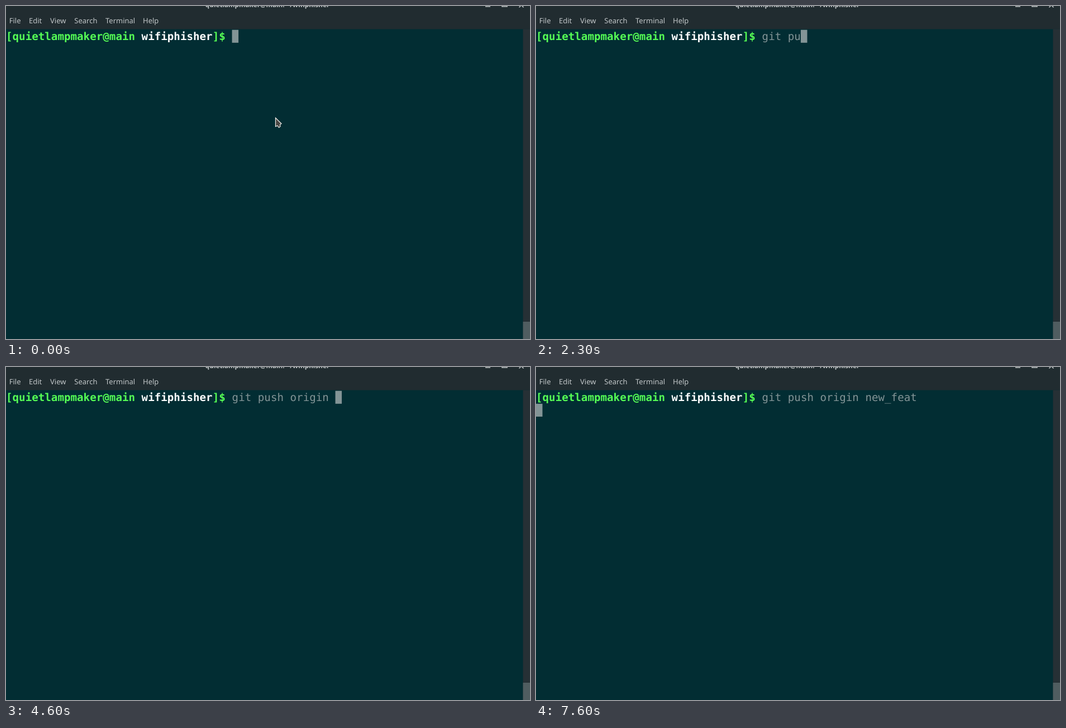
Recreate the animation shown at these times as an HTML page. Size 938 by 597 pixels, loop 8000 ms.

```html
<!DOCTYPE html>
<html lang="en">
<head>
<meta charset="utf-8">
<title>Terminal</title>
<style>
  html, body { margin: 0; width: 100%; height: 100%; overflow: hidden; background: #022d33; }
  svg { display: block; }
  text { white-space: pre; text-rendering: geometricPrecision; }
  .mono { font: 19.2px "DejaVu Sans Mono", monospace; fill: #839496; }
  .prompt { font-weight: bold; fill: #5f5; }
  .menu { font: 13px "Noto Sans", sans-serif; fill: #c1c6c8; }
  .title { font: bold 11.7px "Noto Sans", sans-serif; fill: #c1c6c8; }
</style>
</head>
<body>
<svg width="938" height="597" viewBox="0 0 938 597">
  <rect width="938" height="597" fill="#022d33"/>
  <rect width="938" height="41.500" fill="#212c30"/>
  <rect x="925.500" y="41.500" width="13" height="556" fill="#263035"/>
  <rect x="925.500" y="566" width="13" height="31" fill="#505d60"/>

  <text class="title" x="468" y="2.300" text-anchor="middle">quietlampmaker@main: ~/wifiphisher</text>
  <path d="M858 1h9M888 0v1h9v-1M918.500 2.500l4-4 4 4" fill="none" stroke="#c1c6c8" stroke-width="1.600"/>

  <g class="menu">
    <text x="5.700" y="31">File</text>
    <text x="41" y="31">Edit</text>
    <text x="79" y="31">View</text>
    <text x="122.300" y="31">Search</text>
    <text x="178" y="31">Terminal</text>
    <text x="245" y="31">Help</text>
  </g>

  <text class="mono prompt" x="0" y="61">[quietlampmaker@main <tspan fill="#fff">wifiphisher</tspan>]$</text>
  <text class="mono" id="typed" y="61"></text>
  <rect id="caret" fill="#839496"/>

  <path id="arrow" d="M482.500 200.500V216l3.500-1.500 2.500 3.500 2.500-2-.5-3.500 2.500-1.500z"
        fill="#4a4744" stroke="#f0eeea" stroke-width="1.200"/>
  <path id="beam" d="M479 194.500q3.500 0 3.500 2v9q0 2-3.500 2M486 194.500q-3.500 0-3.500 2v9q0 2 3.500 2"
        fill="none" stroke="#e4e4e0" stroke-width="1.200"/>
</svg>
<script>
  const LOOP = 8000, CELL = 11.5594, ROW = 23.12, TOP = 42.75, PROMPT = 35, ENTER = 7600;
  const command = "git push origin new_feat ";
  // [time, number of characters typed so far]
  const keys = [
    [0, 0], [1000, 2], [1300, 3], [1500, 4], [2300, 6], [2500, 7], [2700, 8], [2800, 9],
    [3100, 10], [3700, 11], [3800, 12], [4100, 13], [4200, 14], [4400, 15], [4600, 16],
    [4900, 17], [5000, 18], [5600, 19], [5900, 20], [6000, 25]
  ];
  const blinks = [[300, 600], [5500, 5600], [7000, 7100]];
  const [typed, caret, arrow, beam] =
    ["typed", "caret", "arrow", "beam"].map(id => document.getElementById(id));
  const show = (el, on) => el.setAttribute("visibility", on ? "visible" : "hidden");
  const within = (t, [from, to]) => t >= from && t < to;

  typed.setAttribute("x", PROMPT * CELL);
  caret.setAttribute("width", CELL);
  caret.setAttribute("height", ROW);

  function draw(t) {
    const count = keys.filter(([time]) => time <= t).pop()[1];
    const entered = t >= ENTER;
    typed.textContent = command.slice(0, count);
    caret.setAttribute("x", entered ? 0 : (PROMPT + count) * CELL);
    caret.setAttribute("y", entered ? TOP + ROW : TOP);
    show(caret, !blinks.some(b => within(t, b)));
    show(arrow, t < 300);
    show(beam, within(t, [300, 700]));
  }

  const start = performance.now();
  function tick() {
    draw((performance.now() - start) % LOOP);
    requestAnimationFrame(tick);
  }
  tick();
</script>
</body>
</html>
```
